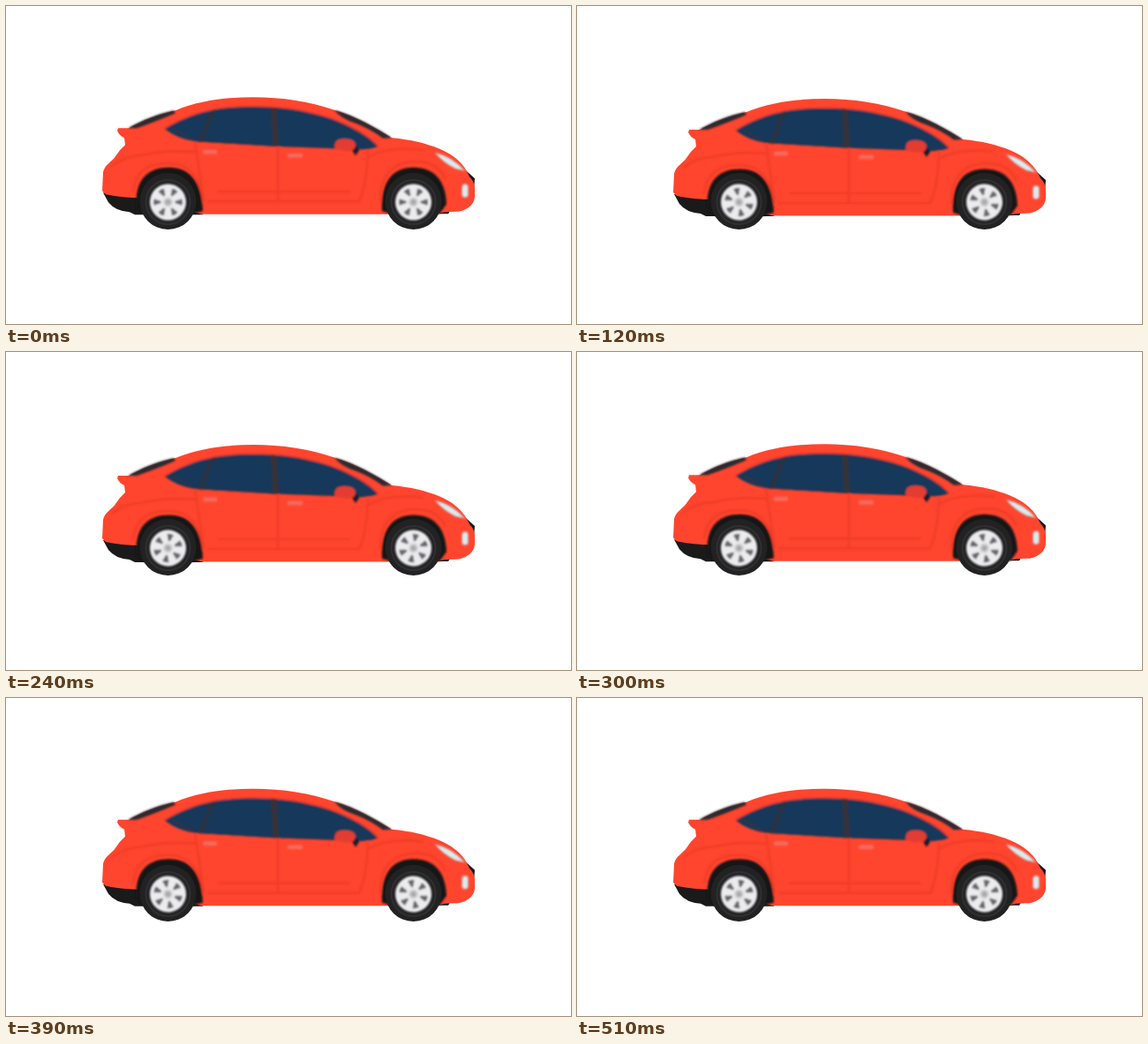
Recreate the animation shown at these times as an HTML page. Size 640 px wide and 360 px high, loop 540 ms.

```html
<!DOCTYPE html>
<html lang="en">
<head>
<meta charset="utf-8">
<title>Red car</title>
<style>
  html, body { margin: 0; width: 100%; height: 100%; overflow: hidden; background: #fff; }
  svg { display: block; width: 100vw; height: 100vh; }
</style>
</head>
<body>
<svg viewBox="0 0 640 360">
  <defs>
    <filter id="soft" x="-10%" y="-10%" width="120%" height="120%"><feGaussianBlur stdDeviation=".8"/></filter>
    <clipPath id="glass">
      <path id="pane" d="M180 139C198 128 216 121 238 117C262 113 298 113 324 117C349 121 371 127 390 137C404 144 414 151 421 159Q410 163 398 162L304 158.5L214 153Q194 150 180 139Z"/>
    </clipPath>
    <g id="rim">
      <circle r="20.5" fill="#ececef"/>
      <g id="gaps" fill="#66666c"></g>
      <circle r="5.5" fill="#d2d2d6"/>
      <circle r="3.2" fill="#aaa9ae"/>
    </g>
  </defs>

  <g id="body">
    <!-- underside -->
    <path fill="#1a1a1a" d="M110 211L153 215L160 236H146L140 233Q124 232 116 222ZM206 224H226L223 236H206ZM486 220H510L501 235H486ZM521 186L531 195L530 209L523 210Z"/>
    <path fill="#ff452e" d="M127 138L139 138C157 128 174 122 192 118C218 107 249 103 280 103C313 103 345 108 372 117.5C397 125 419 138 437 149C459 151 475 155 490 161C505 167 517 177 522 187L525 193Q530 198 531 205V216C530 225 523 230 513 232.5L497 233L487 235.5H222L153 217Q132 217 113 213L109 209L110 188C111 180 121 175 124 170L129 163L135 157L134 149Q128 146 126 141Z"/>
    <g filter="url(#soft)">
      <path d="M180 139C198 128 216 121 238 117C262 113 298 113 324 117C362 122 405 140 421 159" fill="none" stroke="#e23d2c" stroke-width="3"/>
      <g fill="none" stroke="#f03d28" stroke-width="2.6">
        <path d="M308 159V221M214 154C218 177 220 198 224 220M240 210H390M228 221H400Q406 209 409 182L410 163"/>
        <path d="M144 210C147 187 160 178 184 178C207 178 219 192 224 222M424 222C423 190 440 176 464 176C482 176 493 184 498 196"/>
        <path d="M120 181Q136 169 153 169Q182 162 214 165M410 171Q432 158 473 163"/>
      </g>
      <path fill="#282a32" d="M138 138C154 129 171 122 190 118L192 121L180 126Q160 134 148 138ZM372 117.5C396 124 420 138 437 149L427 149.5Q413 139 396 132.5Q379 127 372 117.5Z"/>
      <use href="#pane" fill="#13375a"/>
      <g clip-path="url(#glass)">
        <path d="M239 111L230 128L219 157" fill="none" stroke="#2f303a" stroke-width="4"/>
        <path d="M303 111L306 162" stroke="#373039" stroke-width="6.5"/>
        <path d="M188 138L214 153L304 159L398 163" fill="none" stroke="#3d303c" stroke-width="1.5"/>
      </g>
      <path d="M393 152L400 163L396 169L390 160Z" fill="#171d2a"/>
      <path d="M373 155Q374 150 384 150Q396 150 396 158Q395 164 386 164L374 162Q371 160 373 155Z" fill="#e33e32"/>
      <rect x="223" y="162.5" width="16" height="5" rx="1.5" fill="#f5695c"/>
      <rect x="319" y="166.5" width="17" height="5" rx="1.5" fill="#f5695c"/>
      <path d="M486 166Q505 170 520 186.5L509 184Q495 177 486 166Z" fill="#dcebee" stroke="#c68e88"/>
      <rect x="516.5" y="201.5" width="7" height="15" rx="3" fill="#dce9ed" stroke="#d98a80" stroke-width=".8"/>
      <path d="M148 229C145 197 160 182.5 184.5 182.5C209 182.5 222 199 223 232L208 236H158ZM426 232C424 199 438 182.5 461.5 182.5C485 182.5 498 197 499 224L491 235H438Z" fill="#191919"/>
    </g>
  </g>

  <g id="wheels"></g>
</svg>

<script>
const STEP = 30, COUNT = 18, LOOP = STEP * COUNT;
const body = document.getElementById('body');
const wheels = document.getElementById('wheels');

document.getElementById('gaps').innerHTML = Array.from({ length: 6 }, (_, i) =>
  `<path transform="rotate(${i * 60 + 30})" d="M-1 -8L-3.8 -15.5Q0 -17.5 3.8 -15.5L1 -8Z"/>`).join('');

wheels.innerHTML = [183.5, 461.5].map(x => `
  <g transform="translate(${x} 222)">
    <circle cy="-1" r="32" fill="#222223"/>
    <circle r="25" fill="none" stroke="#303033" stroke-width="2"/>
    <g filter="url(#soft)"><use class="rim" href="#rim"/></g>
  </g>`).join('');
const rims = wheels.querySelectorAll('.rim');

function draw(now) {
  const step = Math.floor(now % LOOP / STEP);
  const phase = 2 * Math.PI * (step / COUNT - 1 / 3);
  const drop = 0.9 + 1.5 * Math.cos(phase);
  body.setAttribute('transform', `translate(0 ${drop.toFixed(2)})`);
  rims.forEach(rim => rim.setAttribute('transform', `rotate(${step * 360 / COUNT})`));
}

const start = performance.now();
function tick() {
  draw(performance.now() - start);
  requestAnimationFrame(tick);
}
tick();
</script>
</body>
</html>
```
